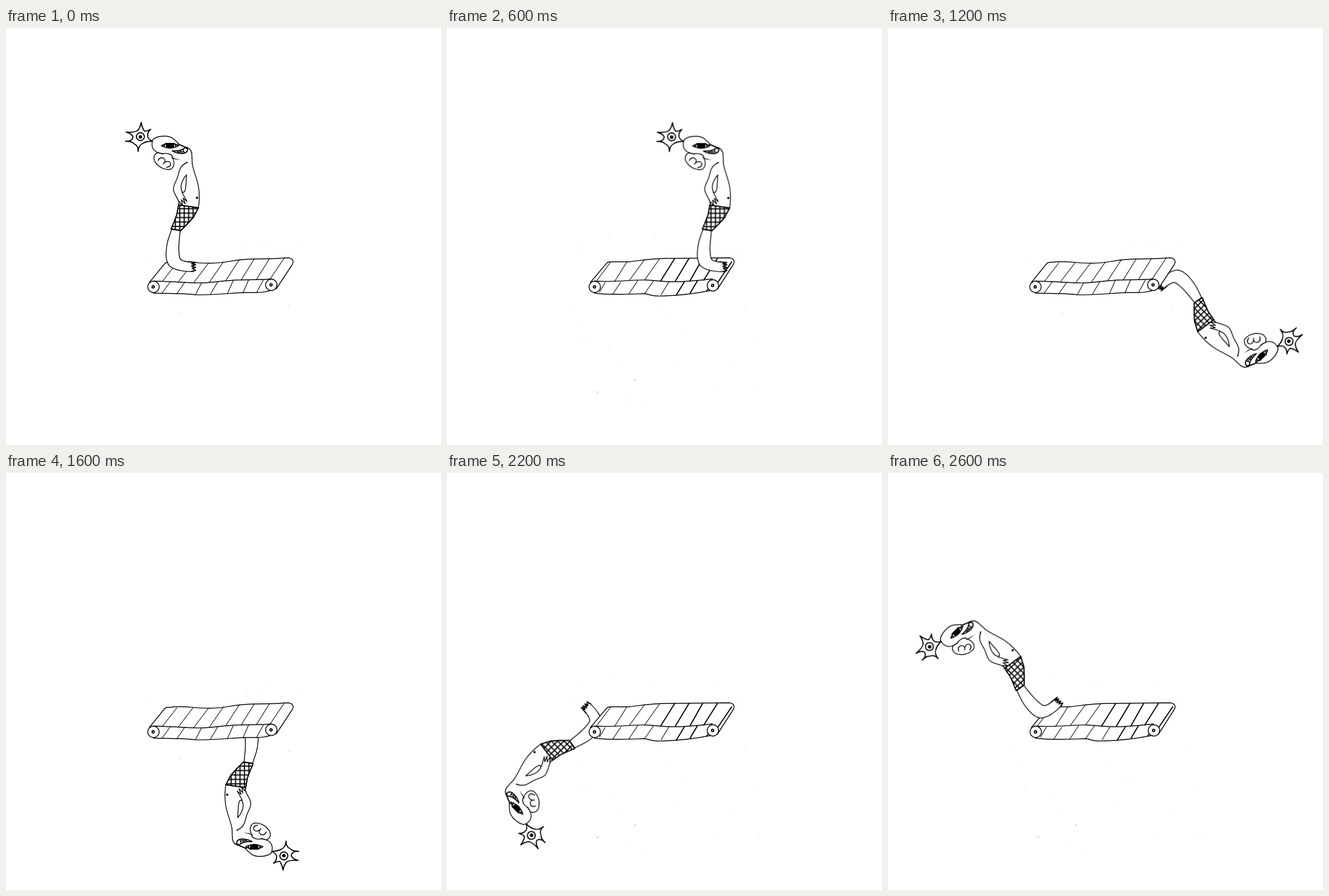
Write an HTML page without scripts that moves like this. It is 764 px wide and 733 px high and loops after 2.8 s.

```html
<!DOCTYPE html>
<html lang="en">
<head>
<meta charset="utf-8">
<title>Treadmill loop</title>
<style>
  html, body { margin: 0; width: 100%; height: 100%; overflow: hidden; background: #fff; }
  svg { display: block; width: 100vw; height: 100vh; }
  .ink { fill: none; stroke: #000; stroke-width: 1.4; stroke-linecap: round; stroke-linejoin: round; }
  .paper { fill: #fff; }
  .solid { fill: #000; }
  .thin { stroke-width: 1.1; }
  .bold { stroke-width: 1.9; }
  .dust { stroke: #aaa; stroke-width: 1; }

  .walk { animation: walk 2.8s step-end infinite; }
  .front { animation: front 2.8s step-end infinite; }
  .behind { animation: behind 2.8s step-end infinite; }
  .belt-a { animation: first .4s step-end infinite; }
  .belt-b { animation: second .4s step-end infinite; }

  @keyframes walk {
    0%     { transform: translate(0, 0); }
    7.14%  { transform: translate(53px, -10px); }
    14.28% { transform: translate(106px, -3.5px); }
    21.42% { transform: translate(158.5px, .3px); }
    28.57% { transform: translate(577px, -96px) rotate(45deg); }
    35.71% { transform: translate(916px, 122px) rotate(90deg); }
    42.85% { transform: translate(1006.4px, 520.7px) rotate(135.3deg); }
    50%    { transform: translate(774px, 866.5px) rotate(180deg); }
    57.14% { transform: translate(724px, 864px) rotate(180deg); }
    64.28% { transform: translate(658px, 866.5px) rotate(180deg); }
    71.42% { transform: translate(592px, 860.5px) rotate(180deg); }
    78.57% { transform: translate(180px, 939px) rotate(-135deg); }
    85.71% { transform: translate(-161px, 737px) rotate(-90deg); }
    92.85% { transform: translate(-229.4px, 335.1px) rotate(-44.65deg); }
  }
  @keyframes front  { 0%, 92.85% { visibility: visible; } 35.71% { visibility: hidden; } }
  @keyframes behind { 0%, 92.85% { visibility: hidden; } 35.71% { visibility: visible; } }
  @keyframes first  { 0% { visibility: visible; } 50% { visibility: hidden; } }
  @keyframes second { 0% { visibility: hidden; } 50% { visibility: visible; } }
</style>
</head>
<body>
<svg viewBox="0 0 764 733" preserveAspectRatio="none">
  <defs>
    <pattern id="plaid" x="303" y="311" width="7.8" height="7.8" patternUnits="userSpaceOnUse">
      <path d="M0 6.5H7.8M2.2 0V7.8" stroke="#000" stroke-width="2"/>
    </pattern>

    <g id="roller">
      <circle r="10" class="paper"/>
      <circle r="2" class="bold" cx="-.5"/>
    </g>

    <g id="man" class="ink">
      <!-- legs -->
      <path class="paper" d="M291 354C287 365 283 374 282 386C280 400 282 412 287 418C295 425 310 428 326 428L333 426L327 422.500L333 421L326 418.500L333 416L326 414.500L333 412L320 411C311 410 306 408 305 404C302 390 304 374 306 356Z"/>
      <path class="bold" d="M320 411L333 412L326 414.500L333 416L326 418.500L333 421L327 422.500L333 426L326 428"/>

      <!-- trunk and arm -->
      <path class="paper" stroke="none" d="M293 228C302 231 312 229 319 236C308 240 304 248 303 256C301 268 295 274 294 283C295 294 300 299 303 311L338 316C340 300 340 288 338 279C335 262 330 252 327 238L326 214L300 205Z"/>
      <path d="M294 229C302 232 311 229 319 236C307 241 305 248 303 256C301 268 294 274 294 283C295 293 301 297 304 307L303 311M327 238C329 252 335 262 338 279C340 290 340 302 338 316"/>
      <path d="M317 258C310 266 306 276 308 284Q310 292 314 287C317 280 316 270 317 258Z"/>
      <path d="M309 289L318 305L311 299L315 309L308 302L310 312L304 305L303 312"/>
      <circle cx="335.500" cy="298.500" r="1.3" class="solid"/>

      <!-- shorts -->
      <path class="paper" d="M303 311L338 316L329 333L318 345L307 356L290 353L295 341L300 328Z"/>
      <path class="bold" fill="url(#plaid)" style="fill:url(#plaid)" d="M303 311L338 316L329 333L318 345L307 356L290 353L295 341L300 328Z"/>

      <!-- head and ear -->
      <path class="paper" d="M267 219C258 222 258 232 264 238C268 244 280 251 290 248C297 243 296 232 291 227C292 222 284 219 275 221Z"/>
      <path class="paper" stroke="none" d="M257 199C258 193 268 190 280 190C291 190 295 196 303 203L318 210Q326 213 326 220L327 238L293 228Q282 220 267 219C258 216 255 208 257 199Z"/>
      <path d="M293 228C292 222 284 219 274 221L267 219C258 216 255 208 257 199C258 193 268 190 280 190C291 190 295 196 303 203M318 210C325 213 327 218 326.500 225L327 238"/>
      <path d="M267 233Q270 226 277 229Q282 233 276 239Q282 232 288 236Q292 243 282 245"/>
      <path class="bold" d="M302 204L319 211"/>
      <path class="bold paper" d="M273 207Q288 199 303 207Q288 215 273 207Z"/>
      <ellipse cx="288" cy="207" rx="7" ry="3.800" class="solid"/>
      <path class="bold" d="M278 205V209M298 205V209M280 203L296 203"/>
      <path class="bold paper" d="M292 216Q308 217 315 210L319 213Q319 219 313 220Q302 222 292 216Z"/>
      <path d="M301 217L303 220M306 215L308 220M311 213L313 219M303 218L312 217"/>

      <!-- burst -->
      <path class="bold" d="M257 199Q247 193 249 189Q248 184 254 178Q247 182 243 181Q239 176 237.500 166Q235 178 230 181Q223 184 211 183Q222 186 223 192Q221 200 210 199Q221 199 224 203Q233 207 232 217Q233 206 240 203Q246 199 257 199"/>
      <circle cx="236" cy="191" r="7" class="bold"/>
      <circle cx="236" cy="191.500" r="2.400" class="solid"/>

      <path class="dust" d="M266 204h.1M273 197h.1M290 196h.1M312 244h.1M321 250h.1M304 264h.1M327 268h.1M301 286h.1M331 289h.1M322 296h.1M325 306h.1M269 242h.1"/>
    </g>
  </defs>

  <g class="behind"><use href="#man" class="walk"/></g>

  <g class="belt-a ink">
    <path class="dust" d="M423 383h.1M451 380h.1M519 380h.1M420 392h.1M497 489h1M308 503h.1M306 501h.1M248 404h.1M391 403h.1M466 377h.1"/>
    <path class="paper" d="M252 447L278 415Q281 411 288 412C310 408 330 414 360 413.500S400 406 440 406S485 404 496 404C505 405 506 412 502 417L475 458L466 461C450 466 440 465 420 465S370 470 333 469C310 466 285 467 259 466Z"/>
    <path d="M259 445C290 445 325 449 345 448S385 444 405 443S450 443 466 441"/>
    <path class="thin" d="M300 413L275 445M329 412L303 446M356 413L330 447M382 411L357 447M410 407L386 444M436 406L413 443M463 405L440 442M489 404L464 441M288 447L274 466M314 447L300 467M343 449L333 468M372 446L359 468M399 444L389 467M426 443L416 466M452 443L440 465"/>
    <use href="#roller" x="259" y="455"/>
    <use href="#roller" x="466" y="451.500"/>
  </g>

  <g class="belt-b ink">
    <path class="dust" d="M284 362h.1M365 365h.1M477 376h.1M227 400h.1M236 374h.1M512 394h.1M219 488h.1M369 485h.1M241 549h.1M238 515h.1M284 568h.1M385 511h.1M422 540h.1M523 488h.1M542 555h.1M548 639h.1M473 632h.1M346 660h.1M312 654h.1M499 590h.1M300 597h.1M404 586h.1"/>
    <path d="M330 619h.1M264 640h.1" stroke="#555"/>
    <path class="paper" d="M252 447L280 414Q282 411 288 411L320 411C345 408 360 405 390 405L496 404C505 405 506 412 502 417L475 459L460 462C430 468 410 470 380 471S360 467 345 467C320 468 290 470 259 466Z"/>
    <path d="M259 445C300 447 330 442 350 443S380 446 400 446S440 444 466 441"/>
    <path class="thin" d="M287 412L263 444M316 411L294 446M347 407L320 444M374 405L347 443M278 447L268 464M305 447L291 468M335 444L319 468M363 444L347 467M390 446L376 469"/>
    <path class="bold" d="M400 405L375 445M425 405L401 445M449 405L427 444M475 405L451 443M500 411L475 448M417 446L403 469M440 444L427 466M461 456L456 462"/>
    <use href="#roller" x="259.500" y="455"/>
    <use href="#roller" x="467" y="452.500"/>
  </g>

  <g class="front"><use href="#man" class="walk"/></g>
</svg>
</body>
</html>
```
